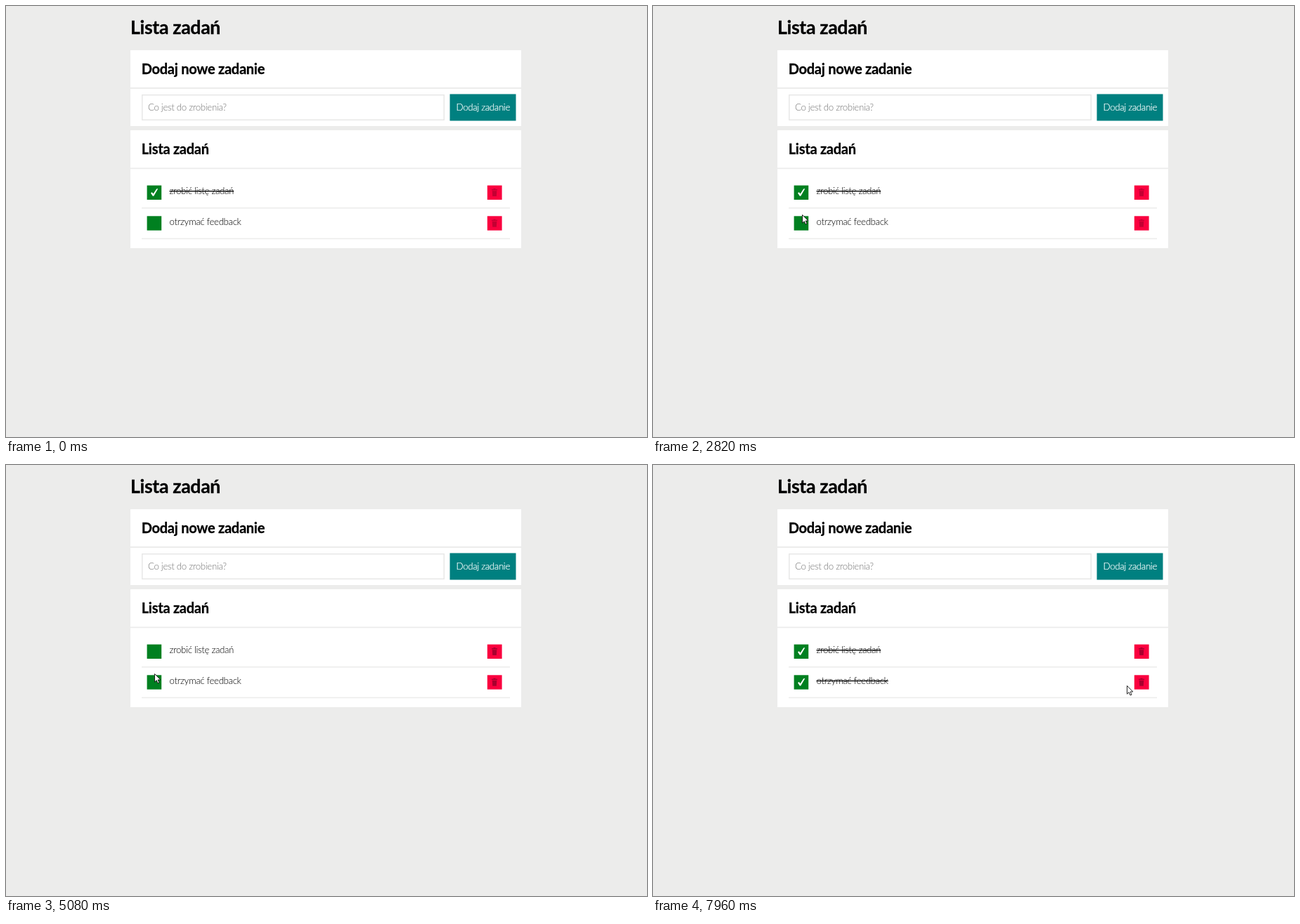
An HTML page for the animation above (8 s loop, 912 by 614 pixels).

```html
<!DOCTYPE html>
<html lang="pl">
<head>
<meta charset="utf-8">
<title>Lista zadań</title>
<style>
  html, body { margin: 0; width: 100%; height: 100%; overflow: hidden; background: #ececeb; }
  svg { display: block; }
  text { font: 300 13.333px Lato, sans-serif; letter-spacing: -.027em; }
  .title, .heading { font-weight: 700; letter-spacing: -.0125em; stroke: #000; stroke-width: .3px; }
  .title { font-size: 26.667px; }
  .heading { font-size: 20px; }
  .button { fill: #fff; stroke: #fff; stroke-width: .2px; }
  .card { fill: #fff; }
  .line { fill: #ececeb; }
  .done .label { text-decoration: line-through; }
  .check { fill: #fff; visibility: hidden; }
  .done .check { visibility: visible; }
</style>
</head>
<body>
<svg width="912" height="614" viewBox="0 0 912 614">
  <text class="title" x="177" y="39.5">Lista zadań</text>

  <rect class="card" x="177" y="63" width="556" height="108"/>
  <text class="heading" x="192.7" y="97">Dodaj nowe zadanie</text>
  <rect class="line" x="177" y="116" width="556" height="2"/>
  <rect x="193.75" y="126.75" width="429.5" height="35.5" fill="#fff" stroke="#e8e8e7" stroke-width="1.5"/>
  <text x="202" y="149" fill="#757575">Co jest do zrobienia?</text>
  <rect x="631.5" y="125.5" width="94" height="38" fill="#008080"/>
  <text class="button" x="640.5" y="149">Dodaj zadanie</text>

  <rect class="card" x="177" y="177" width="556" height="168"/>
  <text class="heading" x="192.7" y="210.5">Lista zadań</text>
  <rect class="line" x="177" y="230.5" width="556" height="1.7"/>

  <g id="rows"></g>

  <circle id="press" r="9" fill="#ff0" fill-opacity=".58"/>
  <path id="arrow" d="M.5 .5V12.2L3.2 9.7L5 14L7 13.2L5.2 9H8.8Z" fill="#fff" stroke="#111" stroke-width=".9"/>
  <path id="beam" d="M-2.5 -7.5H2.5M.5 -7V7M-2.5 7.5H2.5" fill="none" stroke="#111"/>
</svg>
<script>
const LOOP = 8000, TICK = 73;
const ROW_HEIGHT = 43.7;
const byId = id => document.getElementById(id);

// Pointer moves: start time, goal and, for slow ones, duration.
const entry = { x: 1192, y: 840 };
const moves = [
  move(240, 311, 252, 360),
  move(880, 343, 269),
  move(1170, 244, 261, 510),
  move(1760, 207, 269, 290),
  move(2820, 216, 317),
  move(3630, 215, 333, 500),
  move(4210, 206, 311),
  move(4440, 208, 273),
  move(4930, 211, 297),
  move(5220, 216, 317),
  move(5720, 217, 276),
  move(6440, 215, 263),
  move(6810, 214, 309),
  move(7240, 674, 314, 720)
];
const clicks = [
  click(3410, 3490), click(4290, 4360), click(4860, 4860),
  click(6220, 6300), click(6660, 6810), click(7170, 7240)
];
const tasks = [
  { label: "zrobić listę zadań", done: true },
  { label: "otrzymać feedback", done: false }
];

function move(start, x, y, duration = 220) { return { start, x, y, duration }; }
function click(down, up) { return { down, up }; }

byId("rows").innerHTML = tasks.map((task, i) => `
  <g class="row" transform="translate(0 ${i * ROW_HEIGHT})">
    <rect x="200.6" y="255.6" width="20.6" height="20.4" fill="#008020"/>
    <path class="check" d="M206 266.5L207.7 265.3L209.6 267.6L214.2 260.6L216.3 260.2L210.2 270.8H208.8Z"/>
    <text class="label" x="232.5" y="268.2">${task.label}</text>
    <rect x="684.8" y="255.6" width="20.8" height="20.4" fill="#fa003f"/>
    <path class="bin" fill="#a0002c" d="M691 261h2.5v-1h3v1h2.5v1.5h-8zM691.7 263.3h6.6l-.5 7.7h-5.6z"/>
    <rect class="line" x="193" y="287" width="524" height="1.5"/>
  </g>`).join("");
const rows = document.querySelectorAll(".row");

// The pointer advances in whole ticks, the first one at the start of a move.
function pointerAt(time) {
  const index = moves.findLastIndex(step => step.start <= time);
  if (index < 0) return entry;
  const { start, x, y, duration } = moves[index];
  const from = moves[index - 1] || entry;
  const ticks = Math.floor((time - start) / TICK + 0.1) + 1;
  const left = (1 - Math.min(1, ticks * TICK / (duration + TICK))) ** 3;
  return { x: x + (from.x - x) * left, y: y + (from.y - y) * left };
}

const hitsBox = ({ x, y }, row) =>
  x > 200 && x < 222 && Math.abs(y - row * ROW_HEIGHT - 265.5) < 10;

const overText = ({ x, y }) => x > 232 && x < 336
  && tasks.some((task, row) => Math.abs(y - row * ROW_HEIGHT - 263) < 12);

function isDone(row, time) {
  const hits = clicks.filter(({ down, up }) => up <= time && hitsBox(pointerAt(down), row));
  return tasks[row].done !== (hits.length % 2 === 1);
}

function place(id, visible, { x, y }) {
  byId(id).style.visibility = visible ? "visible" : "hidden";
  byId(id).setAttribute("transform", `translate(${Math.round(x)} ${Math.round(y)})`);
}

function draw(time) {
  const pointer = pointerAt(time);
  const text = overText(pointer);
  place("arrow", !text, pointer);
  place("beam", text, pointer);
  place("press", clicks.some(({ down, up }) => time >= down && time < up), pointer);
  rows.forEach((row, i) => {
    row.classList.toggle("done", isDone(i, time));
    row.querySelector(".bin").setAttribute("opacity", time < clicks[0].up ? 0.6 : 0.9);
  });
}

const began = performance.now();
function frame() {
  draw((performance.now() - began) % LOOP);
  requestAnimationFrame(frame);
}
frame();
</script>
</body>
</html>
```
